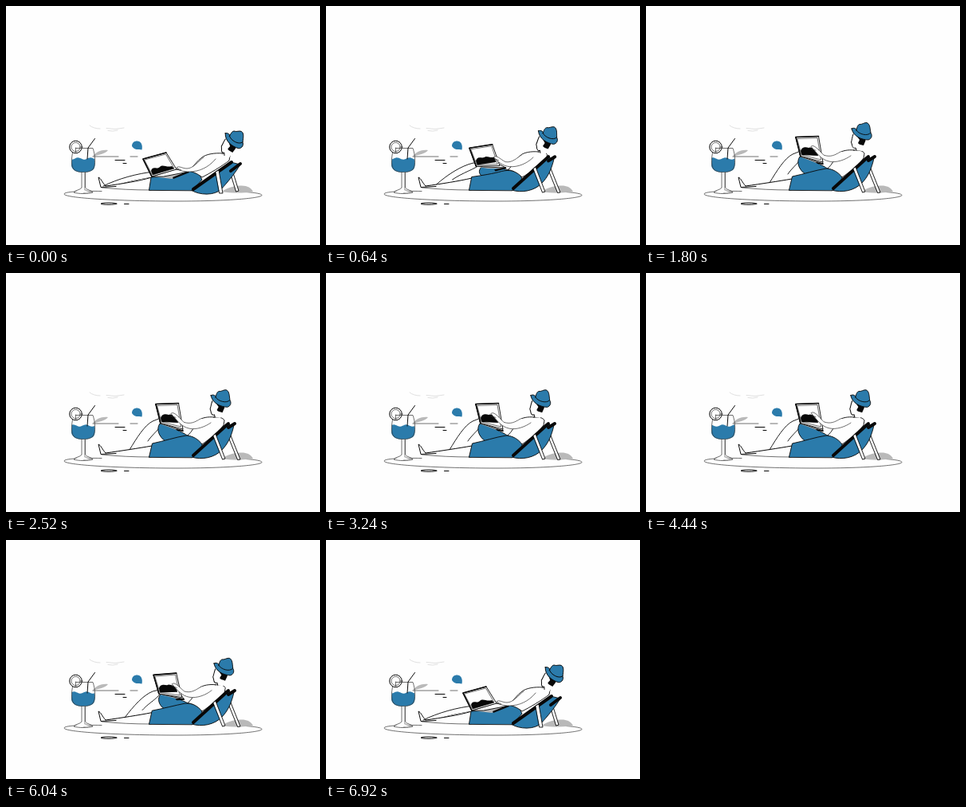
An HTML page that plays this animation: 394 by 300 pixels, repeating every 6960 ms.

```html
<!DOCTYPE html>
<html lang="en">
<head>
<meta charset="utf-8">
<title>Working from the beach</title>
<style>
html, body { margin: 0; width: 100%; height: 100%; overflow: hidden; background: #fefefe; }
svg { display: block; width: 394px; height: 300px; }
path, ellipse, circle { stroke-linejoin: round; stroke-linecap: round; }
.line { fill: none; stroke: #080808; stroke-width: 1; }
.thin { fill: none; stroke: #333; stroke-width: .7; }
.pale { fill: none; stroke: #ccc; stroke-width: .6; }
.white { fill: #fefefe; stroke: #080808; stroke-width: .9; }
.plain { fill: #fefefe; }
.blue { fill: #2b7bab; }
.edged { fill: #2b7bab; stroke: #080808; stroke-width: .9; }
.black { fill: #080808; }
.grey { fill: #b9b9b9; }
.bar { fill: none; stroke: #080808; stroke-width: 4; }
</style>
</head>
<body>
<svg viewBox="0 0 394 300">
  <!-- sea, sky and sand -->
  <path class="pale" d="M105 150 Q110 154 118 154M126 153.500 Q137 156 148 153M128 156.500 Q134 158 140 156"/>
  <path class="blue" d="M158 176 C158 171.500 161 169.500 164.500 169.500 C169 169.500 172 174 170.500 180.500 C166 180 161 181 158 176Z"/>
  <path class="grey" d="M109 188.500 C113 183 120 180 128 181 C125 185 117 187 109 188.500Z"/>
  <path class="thin" d="M109 189H141M156 189H165"/>
  <path class="line" d="M137 193.500H149M147 197.500H151M148.500 248.500H154"/>
  <path class="thin" d="M120 232.500 C95 232 73 233 73 236 C73 241 140 245 215 245 C280 245 321 241 321 237.500 C321 235 306 233.500 290 233"/>
  <ellipse class="line" cx="129" cy="248.200" rx="10" ry="1.100"/>
  <path class="grey" d="M271 233 C276 229 284 226 294 225.500 C302 225 308 228 310 233 C298 235 283 235 271 233Z"/>

  <!-- drink -->
  <path id="liquid" class="blue"/>
  <path class="thin" d="M86 178.500H109C112 187 113 200 109 205C104 210 90 210 85 205C81 200 82 188 85 179"/>
  <path class="grey" d="M97 209H99.500V230C102 232 106 232 109 234L97 235Z"/>
  <path class="plain" d="M95 209H98V231L104 234H86L95 229Z"/>
  <path class="thin" d="M95 209V228C93 231 87 231 85 234C91 236 103 236 109 234C107 231 101 231 99.500 228V209"/>
  <path class="line" d="M111.500 166.500 L103 178 L102 192"/>
  <circle class="plain" cx="87.500" cy="177" r="8"/>
  <circle class="line" cx="87.500" cy="177" r="7.800"/>
  <circle class="thin" cx="87.500" cy="177" r="5.600"/>
  <path class="thin" d="M87.500 178.500H95M87.500 178V184"/>
  <g id="figure"></g>
</svg>
<script>
const LOOP = 6960, RISE_END = 1280, FALL_START = 5720, FALL_END = 6920;
const NUMBER = /-?\d+(\.\d+)?/g;
const figure = document.getElementById('figure');
const liquid = document.getElementById('liquid');
const parts = [];

const clamp = (x) => Math.min(1, Math.max(0, x));
const ease = (x) => (x = clamp(x), x * x * (3 - 2 * x));
const same = (p) => p;
const early = (p) => ease(p * 1.8);

function add(tag, cls, parent = figure) {
  const node = document.createElementNS('http://www.w3.org/2000/svg', tag);
  if (cls) node.setAttribute('class', cls);
  return parent.appendChild(node);
}

// A part blends between its lying and its sitting outline; both use the same commands.
function part(cls, lying, sitting, { parent, pace = same } = {}) {
  parts.push({ node: add('path', cls, parent), lying, goal: sitting.match(NUMBER).map(Number), pace });
}

// legs
part('white',
  'M122 226 C140 217 165 210 186 208 L196 214 C178 215 155 220 139 225',
  'M155 222 C164 207 174 191 184 186 L194 182 L199 193 C186 199 178 211 171 219');
part('plain',
  'M120 227 C145 224 165 217 184 215 L183 231 L120 229Z',
  'M120 227 C145 224 165 221 184 217 L183 231 L120 229Z');
part('line', 'M125 226 C146 223 166 220 183 215', 'M125 226 C146 223 166 220 183 217');
add('path', 'line').setAttribute('d', 'M138 226.5 L119 227.5 L116 215 C119 216 121 222 125 226');
add('path', 'thin').setAttribute('d', 'M120 228 C140 230 160 231 182 231');

// deck chair
const chair = { pace: early };
part('white', 'M281 207 L284 206 L292 232 L289 233Z', 'M279 205 L282 204 L294 234 L291 234.5Z', chair);
part('edged',
  'M232 231 C243 238 262 238 270 230 C278 221 286 212 294 199 L282 196Z',
  'M233 231 C245 235 262 232 271 222 C278 215 283 205 286 191 L276 190Z', chair);
part('bar', 'M282 207 L294 198', 'M279 194 L287 189', chair);

// shorts: raised leg, then near leg
part('edged',
  'M190 215 C190 214 195 213 200 213 C212 213 221 208 229 207 L224 214Z',
  'M200 211 C192 206 188 196 193 189 C202 191 221 199 229 205 L224 209Z');
part('edged',
  'M179.5 231 L182 215 C195 214 207 215 215 211 C224 206 235 206 243 212 L246 218 L234 231.5Z',
  'M179.5 231 L183.5 214 C198 211 213 206 226 204 C236 204 242 208 246 214 L246 218 L234 231.5Z');

// torso
part('white',
  'M272 185 C262 184 251 186 246 190 C240 194 235 202 229 207 C234 208 240 210 246 215 C256 210 271 201 280 194 L281 188 C279 185 275 185 272 185Z',
  'M261 181 C253 180 246 182 243 184 C237 190 234 199 228 204 C234 205 241 208 246 215 C255 209 266 200 273 191 L274 185 C272 181 266 181 261 181Z');
part('bar', 'M235 230 L283 196', 'M235 229 L279 189', chair);
part('white', 'M263 208 L267 206 L272 235 L268 235Z', 'M260 204 L263 202 L275 233 L272 234Z', chair);

// laptop
part('grey',
  'M183 214 L213 205 L229 208 L208 217Z',
  'M193 189 L221 194 L222 200 L198 191Z');
part('white',
  'M183 214 L213 205 L229 208 L198 214Z',
  'M193 187 L221 192 L222 198 L198 190Z');
part('black', 'M209 215 L229 207 L230 209 L210 217Z', 'M213 196 L222 197 L223 199 L215 198Z');
part('white',
  'M172 192 L201 184 L214 205 L183 214Z',
  'M188 164.5 L216.5 163.5 L222 196 L194 188.5Z');
part('thin',
  'M174 193 L200.5 186 L211 204 L184 212Z',
  'M190 166.5 L215 165.5 L219.5 193 L195.5 187Z');
part('black',
  'M182 207 C184 200 189 206 193 202 C197 198 201 203 208 201 L211 204 L184 212Z',
  'M194 182 C196 176 201 177 204 178 C207 176 210 180 214 178 L216 188 L195.5 187Z');
part('line', 'M183 214 L172 192 L201 184', 'M194 188.5 L188 164.5 L216.5 163.5');
figure.lastChild.style.strokeWidth = 1.6;

// typing arm
const arm = add('g');
part('plain',
  'M214 203 C217 200 221 204 227 204 C235 204 241 195 248 190 L263 192 C254 203 242 208 230 208 C223 208 217 207 214 203Z',
  'M207 176 C211 173 216 180 223 187 C232 190 237 187 244 183 L261 188 C254 193 239 197 230 195 C220 193 214 184 207 176Z', { parent: arm });
part('thin',
  'M248 190 C241 195 235 204 227 204 C221 204 217 200 214 203 C217 207 223 208 230 208 C242 208 254 203 263 192',
  'M244 183 C237 187 232 190 223 187 C216 180 211 173 207 176 C214 184 220 193 230 195 C239 197 250 193 257 188', { parent: arm });
part('thin', 'M215 204 L220 206', 'M207 179 L213 181', { parent: arm });

// head, in its sitting position
const head = add('g');
const shape = (cls, d) => add('path', cls, head).setAttribute('d', d);
shape('plain', 'M260 160 C258 166 258 170 259 174 C259 180 262 177 264 181 L271 182 L272 160Z');
shape('line', 'M260 161 C258.5 165 258.5 168 257.5 171 L258.5 174 C259 178 261 179 263 178 L264 181');
shape('black', 'M265 164 C270 162 276 166 275.5 169 L273 175 C270 174 267 174 266 172 L268 168Z');
shape('edged', 'M258 154 C261 152 264 154 266 157 L281 158 C285 162 283 167 279 168 C271 168 260 164 258 154Z');
shape('edged', 'M264 156 C265 151 266 149 268 148.5 C271 149 274 146 277 146.5 C281 148 281 153 282 159 C278 164 267 161 264 156Z');

function blend({ node, lying, goal, pace }, p) {
  const k = pace(p);
  let i = 0;
  node.setAttribute('d', lying.replace(NUMBER, (n) => (+n + (goal[i++] - n) * k).toFixed(2)));
}

function drawLiquid(t) {
  const phase = t / LOOP * Math.PI * 20;
  let d = 'M82 200';
  for (let x = 82.5; x <= 112; x += 1.5) {
    d += `L${x} ${(191.5 + 1.2 * Math.sin(x * .4 - phase)).toFixed(2)}`;
  }
  liquid.setAttribute('d', d + 'C112.5 201 111 205 108 206.5 C102 209.5 91 209.5 86 206.5 C83 204 82 202 82 200Z');
}

function draw(t) {
  const p = t < FALL_START ? ease(t / RISE_END)
    : 1 - ease((t - FALL_START) / (FALL_END - FALL_START));
  parts.forEach((item) => blend(item, p));

  const nod = ease((t - 1800) / 1000) * (1 - ease((t - 4500) / 1100));
  head.setAttribute('transform',
    `translate(${14 * (1 - p) - 1.5 * nod} ${8 * (1 - p)}) rotate(${15 * (1 - p) + 2 * nod} 268 165)`);

  const tap = Math.sin(t / LOOP * Math.PI * 38) * p;
  arm.setAttribute('transform', `rotate(${tap * .7} 250 188)`);
  drawLiquid(t);
}

function tick(now) {
  draw(now % LOOP);
  requestAnimationFrame(tick);
}
draw(0);
requestAnimationFrame(tick);
</script>
</body>
</html>
```
